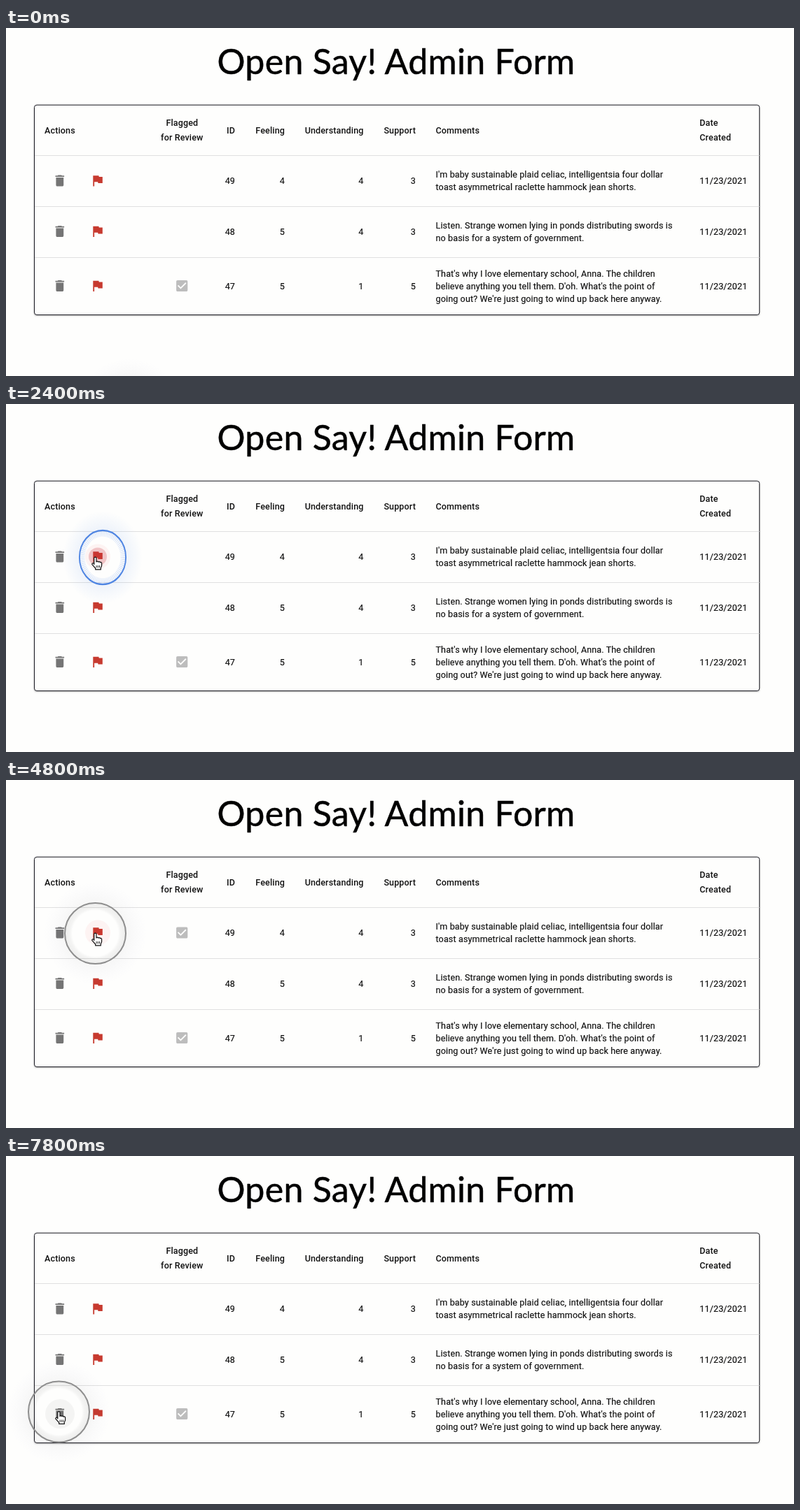
An HTML page that plays this animation: 1125 px wide and 498 px high, repeating every 8000 ms.

```html
<!DOCTYPE html>
<html lang="en">
<head>
<meta charset="utf-8">
<title>Admin form</title>
<style>
  html, body { margin: 0; width: 100%; height: 100%; overflow: hidden; background: #fefefd; }
  svg { display: block; }
  text { font: 12.5px Roboto, sans-serif; letter-spacing: .15px; fill: #111; stroke: #111; stroke-width: .18px; }
  .head { font-weight: 500; stroke: none; }
  .title { font: 50px Lato, sans-serif; letter-spacing: .3px; fill: #000; stroke: #000; stroke-width: .5px; stroke-linejoin: round; }
  .table { fill: #fefefd; stroke: #1a1a22; filter: drop-shadow(0 1.5px 1px rgba(0, 0, 0, .28)); }
  .rule { stroke: #e0e0e0; }
</style>
</head>
<body>
<svg id="stage" width="1125" height="498" viewBox="0 0 1125 498">
  <defs>
    <path id="trash" fill="#757575" d="M6 19c0 1.1.9 2 2 2h8c1.1 0 2-.9 2-2V7H6v12zM19 4h-3.5l-1-1h-5l-1 1H5v2h14V4z"/>
    <path id="flag" fill="#c73a2f" d="M14.4 6L14 4H5v17h2v-7h5.6l.4 2h7V6z"/>
    <path id="check" fill="#bdbdbd" d="M19 3H5c-1.11 0-2 .9-2 2v14c0 1.1.89 2 2 2h14c1.11 0 2-.9 2-2V5c0-1.1-.89-2-2-2zm-9 14l-5-5 1.41-1.41L10 14.17l7.59-7.59L19 8l-9 9z"/>
    <radialGradient id="grayGlow">
      <stop offset=".44" stop-opacity="0"/>
      <stop offset=".49" stop-opacity=".04"/>
      <stop offset=".58" stop-opacity=".065"/>
      <stop offset=".6" stop-color="#223" stop-opacity=".035"/>
      <stop offset="1" stop-color="#66c" stop-opacity="0"/>
    </radialGradient>
    <radialGradient id="blueGlow">
      <stop offset=".44" stop-color="#4a84e4" stop-opacity="0"/>
      <stop offset=".58" stop-color="#4a84e4" stop-opacity=".09"/>
      <stop offset="1" stop-color="#4a84e4" stop-opacity="0"/>
    </radialGradient>
  </defs>
  <text class="title" x="557" y="66" text-anchor="middle">Open Say! Admin Form</text>
  <rect class="table" x="40.5" y="110.2" width="1035.2" height="300.3" rx="3.5"/>
  <g id="content"></g>
  <g id="topCheck"></g>
  <circle id="hover"/>
  <circle id="ripple" cx="131" cy="218.5" fill="#c8303a"/>
  <g id="halo">
    <circle r="74" fill="url(#grayGlow)"/>
    <circle r="43.5" fill="none" stroke="#8e8e8e" stroke-width="2"/>
  </g>
  <g id="press" transform="translate(138 219.5) scale(.77 .9)">
    <circle r="74" fill="url(#blueGlow)"/>
    <circle r="37.5" fill="none" stroke="#c8d9f7" stroke-width="9" stroke-dasharray="1 1.9" opacity=".7"/>
    <circle r="43" fill="none" stroke="#4d84e2" stroke-width="2.4"/>
  </g>
  <path id="arrow" fill="#111" stroke="#fff" d="M0 0V14.6L3.4 11.5L5.7 17L8.3 15.9L6 10.6H10.4Z"/>
  <g id="hand" stroke="#111" stroke-width="1.2" stroke-linejoin="round">
    <path fill="#fff" d="M-1.7 10V1.3a1.6 1.6 0 0 1 3.2 0V6.4a1.5 1.5 0 0 1 2.8.3a1.4 1.4 0 0 1 2.6.6a1.3 1.3 0 0 1 2.2 1V12L7.8 15V17.4H.2V15.5L-4.6 10.2a1.5 1.5 0 0 1 2.4-1.6z"/>
    <path fill="none" stroke-width=".9" d="M1.6 11.5v3.3M3.8 11.5v3.3M6 11.5v3.3"/>
  </g>
</svg>
<script>
const $ = id => document.getElementById(id);
const LOOP = 8000, STEP = 200, LAG = 40;

const label = (x, y, str, anchor = 'start', cls = '') =>
  `<text x="${x}" y="${y + 4.5}" text-anchor="${anchor}" class="${cls}">${str}</text>`;
const icon = (name, x, y) =>
  `<use href="#${name}" transform="translate(${x} ${y}) scale(.9) translate(-12 -12)"/>`;

const numberColumns = [327, 398, 510.5, 585];
const rows = [
  { y: 218.5, top: 182, values: [49, 4, 4, 3], lines: [
    "I'm baby sustainable plaid celiac, intelligentsia four dollar",
    'toast asymmetrical raclette hammock jean shorts.'] },
  { y: 291, top: 255, values: [48, 5, 4, 3], lines: [
    'Listen. Strange women lying in ponds distributing swords is',
    'no basis for a system of government.'] },
  { y: 369, top: 328, values: [47, 5, 1, 5], lines: [
    "That's why I love elementary school, Anna. The children",
    "believe anything you tell them. D'oh. What's the point of",
    "going out? We're just going to wind up back here anyway."] },
];

function tableContent() {
  const head = (x, y, str, anchor) => label(x, y, str, anchor, 'head');
  let out = head(55, 146, 'Actions') + head(251.3, 135, 'Flagged', 'middle') +
    head(251.3, 156, 'for Review', 'middle') + head(613.5, 146, 'Comments') +
    head(990.3, 135, 'Date') + head(990.3, 156, 'Created');
  ['ID', 'Feeling', 'Understanding', 'Support'].forEach((name, i) => {
    out += head(numberColumns[i], 146, name, 'end');
  });
  for (const { y, top, values, lines } of rows) {
    out += `<path class="rule" d="M41 ${top + .5}H1075.5"/>`;
    out += icon('trash', 76.8, y) + icon('flag', 130.6, y);
    values.forEach((v, i) => { out += label(numberColumns[i], y, v, 'end'); });
    lines.forEach((line, i) => {
      out += label(613.5, y + 18 * (i - (lines.length - 1) / 2), line);
    });
    out += label(990.3, y, '11/23/2021');
  }
  return out + icon('check', 251.2, 369);
}
$('content').innerHTML = tableContent();
$('topCheck').innerHTML = icon('check', 251.2, 218.5);

// Pointer path: time, x, y
const path = [
  [0, 176, 546], [1000, 144.5, 373], [1200, 137, 325], [1400, 130, 250], [1600, 127.5, 219.5],
  [6000, 127.5, 219.5], [6200, 111, 268], [6400, 95, 316], [6600, 87.5, 334],
  [7000, 76, 365], [7200, 75.5, 366], [LOOP, 75.5, 366],
];

function pointerAt(time) {
  const t = Math.max(0, time);
  const i = path.findIndex((p, n) => n > 0 && t <= p[0]);
  const [t0, x0, y0] = path[i - 1], [t1, x1, y1] = path[i];
  const k = (t - t0) / (t1 - t0);
  return [x0 + (x1 - x0) * k, y0 + (y1 - y0) * k];
}

const show = (el, on) => el.setAttribute('visibility', on ? 'visible' : 'hidden');
const place = (el, [x, y]) => el.setAttribute('transform', `translate(${x} ${y})`);
function set(el, attrs) {
  for (const name in attrs) el.setAttribute(name, attrs[name]);
}

function render(t) {
  const tip = pointerAt(t);
  const onFlag = t >= 1600 && t <= 6000, onTrash = t >= 7000;
  const pressed = t === 2400 || t === 5000;

  place($('arrow'), tip);
  place($('hand'), tip);
  place($('halo'), pointerAt(t - LAG));
  show($('arrow'), !onFlag && !onTrash);
  show($('hand'), onFlag || onTrash);
  show($('halo'), !pressed);
  show($('press'), pressed);
  show($('topCheck'), t >= 2800 && t < 5400);

  show($('hover'), onFlag || onTrash);
  set($('hover'), onFlag
    ? { cx: 131, cy: 218.5, r: 18, fill: '#e03030', opacity: .05 }
    : { cx: 77, cy: 369, r: 21, fill: '#000', opacity: .04 });

  const age = t - (t < 4000 ? 2300 : 4900);
  show($('ripple'), age > 0 && age < 500);
  set($('ripple'), { r: Math.min(20, 9 + Math.max(0, age) * .04), opacity: Math.max(0, .3 - age * .0006) });
}

function frame(now) {
  render(Math.floor(now % LOOP / STEP) * STEP);
  requestAnimationFrame(frame);
}
render(0);
requestAnimationFrame(frame);
</script>
</body>
</html>
```
